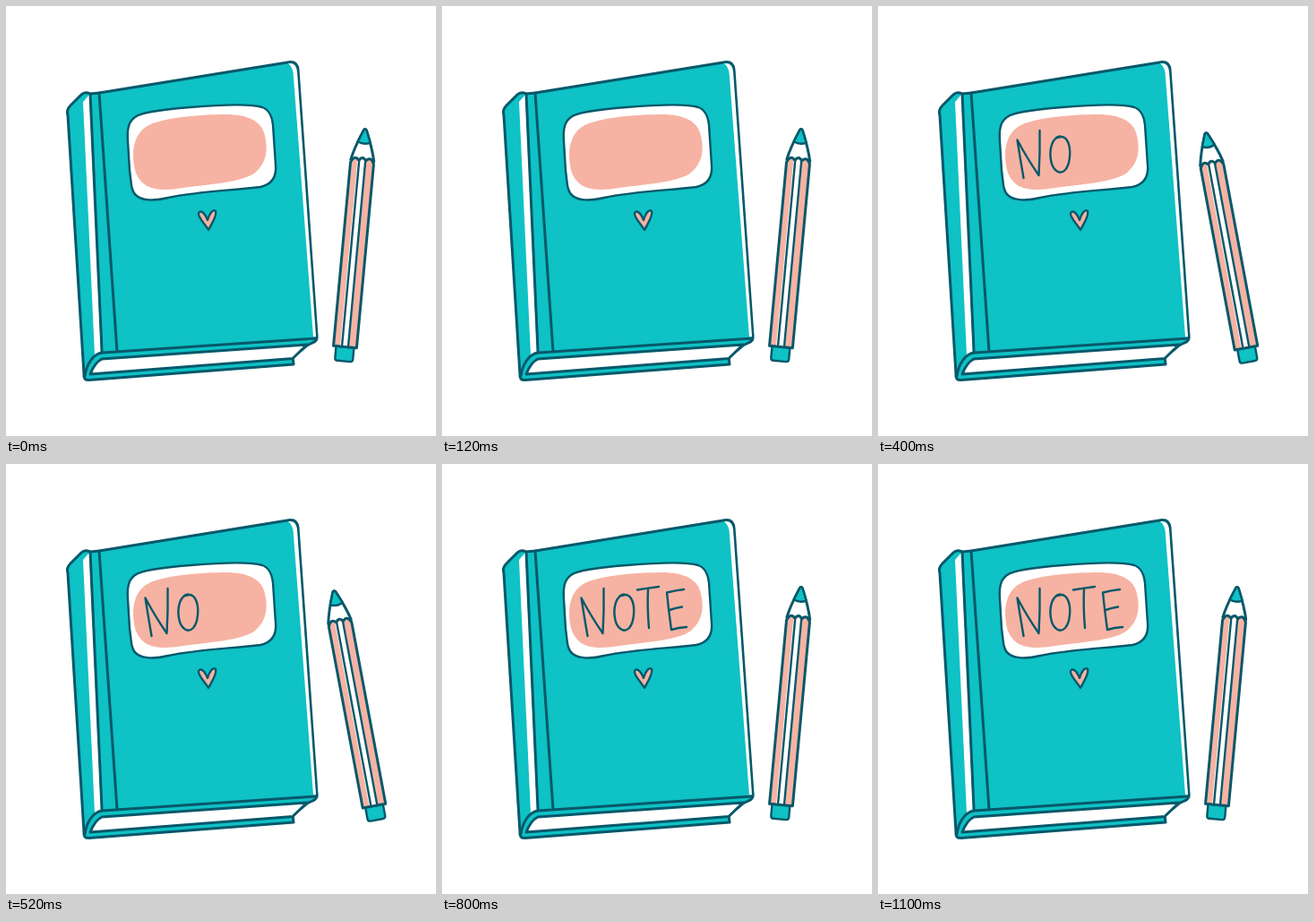
An HTML page for the animation above (1.3 s loop, 480x480 px).

```html
<!DOCTYPE html>
<html lang="en">
<head>
<meta charset="utf-8">
<title>Note</title>
<style>
  html, body { margin: 0; width: 100%; height: 100%; overflow: hidden; background: #fff; }
  svg { display: block; width: 100%; height: 100%; }
  path { stroke: #07586a; stroke-width: 3; stroke-linecap: round; stroke-linejoin: round; fill: none; }
  .teal { fill: #0ec2c5; }
  .pink { fill: #f6b3a3; }
  .white { fill: #fff; }
  .flat { stroke: none; }
  .thin, #word path { stroke-width: 2.4; }
</style>
</head>
<body>
<svg viewBox="0 0 480 480">
  <!-- book -->
  <path class="teal" d="M69 122Q67 116 72 111L84 99Q88 95 94 98L104 97L317 62.500Q325 62 326 71L347 368Q348 374 342 376L336 379L320 392L321 400L93 417.500Q86 418 87 411Z"/>
  <path class="white flat" d="M86 107L93 99L106 385L99 390Z"/>
  <path class="white flat" d="M315 64Q324 63 325 73L346 369L343 369.500L321 80Q321 69 315 64Z"/>
  <path class="white" d="M94 411Q99 398 107 394L336 378L320 393.500Z"/>
  <path d="M94 98L107 385M104 97L124 386M88 413C90 400 97 388 108 387L346 371"/>

  <!-- label -->
  <path class="white thin" d="M136 151C135 137 137 129 144 124C152 118 180 115 206 113C230 111 270 108 286 113C294 116 297 123 298 133L301 178C302 190 297 199 284 202C250 206 213 207 181 214C165 218 152 217 146 212C139 207 140 196 138 184Z"/>
  <path class="pink flat" d="M142 165C143 147 150 135 167 130C185 124 220 121 245 121C271 121 286 129 289 145C293 162 290 176 278 186C264 197 225 199 198 203C175 207 160 205 152 197C144 189 142 178 142 165Z"/>
  <path class="pink thin" d="M226 250C222 243 214 236 215 231C217 227 222 231 225 239C227 232 231 226 234 229C236 234 229 244 226 250Z"/>

  <g id="word" role="img" aria-label="NOTE">
    <path d="M162.500 192Q159 172 155.500 149.500Q167 171 179.500 189Q181 164 180.500 139"/>
    <path d="M203 145.500C194 147 191 161 193 172C195 184 203 189 209 183C215 176 216 158 211 150Q207 144 201 147"/>
    <path d="M218 140.500Q230 138.500 242 137M230 139Q229 160 231 183"/>
    <path d="M270 140Q261 141 251 143.500Q253 164 256 185Q264 182.500 273 182M254 163Q261 160.500 268 159.500"/>
  </g>

  <g id="pencil">
    <path class="teal thin" d="M-10 114H10V127Q10 130 7 130H-7Q-10 130 -10 127Z"/>
    <path class="white" d="M-13 -95Q-10 -109 -1.500 -129Q0 -131 1.500 -129Q10 -109 13 -95Z"/>
    <path class="teal thin" d="M-7 -115.500L-1.500 -129Q0 -131 1.500 -129L7 -115.500Q0 -112 -7 -115.500Z"/>
    <path class="pink" d="M-13 114V-92Q-9 -101 -4 -95Q0 -101 4 -95Q9 -101 13 -92V114Z"/>
    <path class="white flat" d="M-5.500 112.500V-94L-4 -93L0 -96L4.500 -93V112.500Z"/>
    <path class="thin" d="M-3.500 114V-95M3.500 114V-95"/>
  </g>
</svg>
<script>
const LOOP = 1300, STEP = 200;
// x, y and tilt of the pencil's middle
const right = [389, 267, 5.3], upright = [390, 267.5, -2.6], left = [390, 269.5, -10.6];
const poses = [right, upright, left, upright, right];
const letters = document.querySelectorAll('#word path');
const pencil = document.getElementById('pencil');

function draw(time) {
  const step = Math.min(4, Math.floor(time % LOOP / STEP));
  const [x, y, tilt] = poses[step];
  pencil.setAttribute('transform', `translate(${x} ${y}) rotate(${tilt})`);
  letters.forEach((letter, i) => letter.style.display = i < step ? '' : 'none');
}

let start;
function tick(now) {
  start ??= now;
  draw(now - start);
  requestAnimationFrame(tick);
}
draw(0);
requestAnimationFrame(tick);
</script>
</body>
</html>
```
